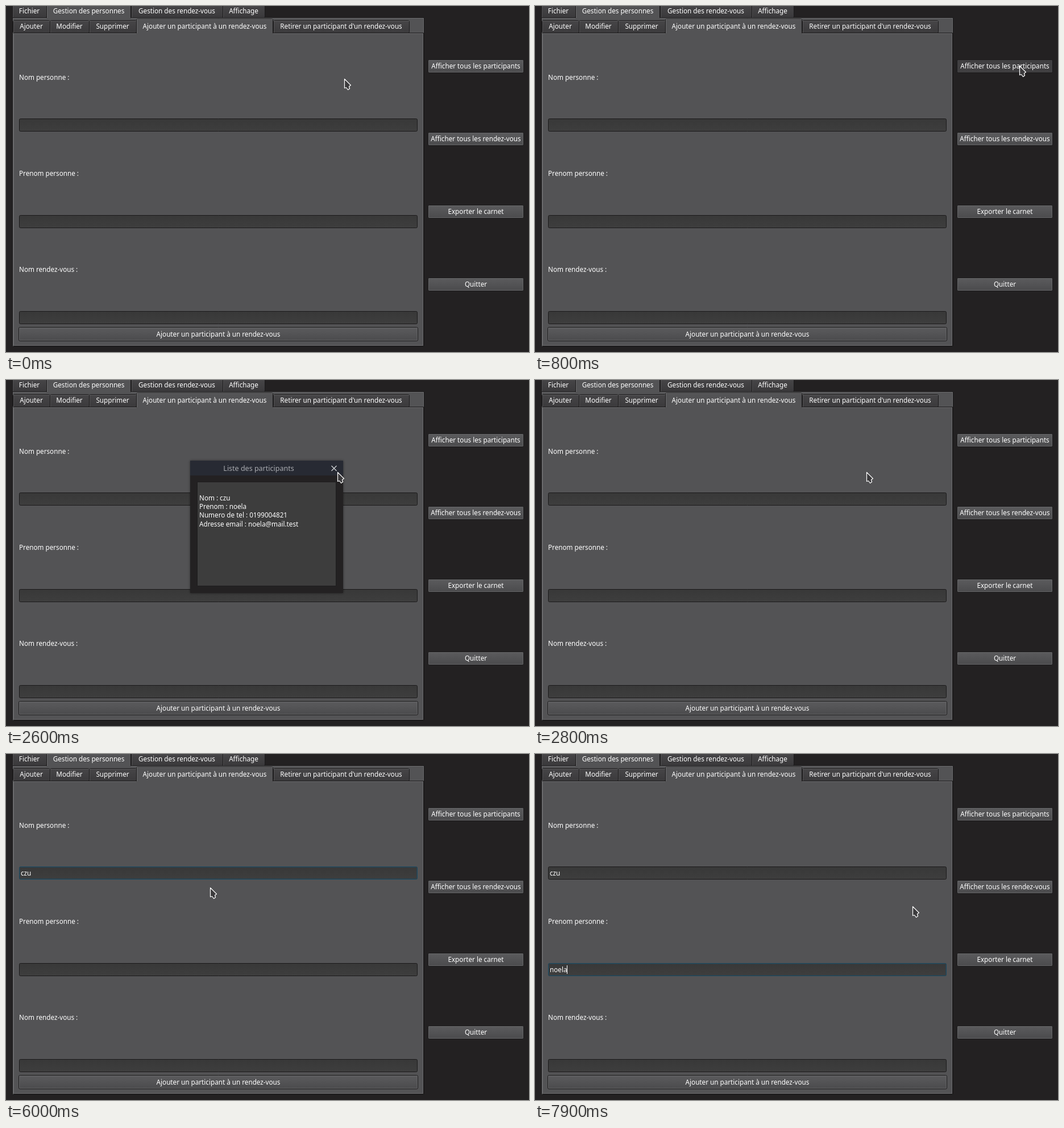
An HTML page with a canvas that plays this animation: 920 px wide and 609 px high, repeating every 8000 ms.

```html
<!DOCTYPE html>
<html lang="fr">
<head>
<meta charset="utf-8">
<title>Carnet de rendez-vous</title>
<style>
  html, body { margin: 0; width: 100%; height: 100%; overflow: hidden; background: #232122; }
  canvas { display: block; width: 920px; height: 609px; }
</style>
</head>
<body>
<canvas id="stage" width="920" height="609"></canvas>
<script>
const ctx = document.getElementById('stage').getContext('2d');
const LOOP = 8000;
const TICK = 100;
const FONT = '500 11.7px "Noto Sans", "Open Sans", sans-serif';
const TITLE_FONT = '12.5px "Noto Sans", "Open Sans", sans-serif';
const BACK = '#232122';
const FACE = '#535355';
const EDGE = '#1b1a1b';
const SHINE = '#6b6b6d';

// Pointer moves: first tick, last tick, end x, y, and bend x, y.
const HOME = [595, 128];
const MOVES = [
  [200, 500, 857, 103, 1000, 140],
  [700, 700, 852, 105],
  [900, 1500, 492, 236, 720, 220],
  [1800, 1800, 479, 234],
  [2000, 2600, 583, 162, 590, 110],
  [3000, 3500, 377, 201, 480, 105],
  [4000, 4000, 376, 201],
  [4500, 4500, 375, 202],
  [6000, 6000, 359, 235],
  [6100, 6500, 309, 382, 325, 310],
  [7700, 7900, 664, 268, 500, 330]
];

const NAME = [[0, ''], [4600, 'c'], [4900, 'cs'], [5200, 'c'], [5300, 'cz'], [5500, 'czu']];
const FIRST = [[0, ''], [6900, 'n'], [7000, 'no'], [7100, 'noe'], [7200, 'noel'], [7500, 'noela']];
const FOCUS = [[0, -1], [3500, 0], [6500, 1]];
const CARET_RESET = [...FOCUS, ...NAME, ...FIRST].map(k => k[0]);

const latest = (keys, t) => keys.filter(k => k[0] <= t).pop()[1];
const dialogOpen = t => t >= 900 && t < 2800;

function pointerAt(t) {
  const now = Math.floor(t / TICK) * TICK;
  let [x, y] = HOME;
  for (const [from, to, ex, ey, bx = ex, by = ey] of MOVES) {
    if (now < from) break;
    const u = Math.min(1, (now - from + TICK) / (to - from + TICK));
    const bend = (a, b, c) => (1 - u) ** 2 * a + 2 * u * (1 - u) * b + u * u * c;
    [x, y] = [bend(x, bx, ex), bend(y, by, ey)];
  }
  return [Math.round(x), Math.round(y)];
}

function overText(x, y, t) {
  if (dialogOpen(t)) return x > 336 && x < 581 && y > 179 && y < 363;
  return x > 23 && x < 724 && [198, 368, 537].some(top => y >= top && y < top + 23);
}

function box(x, y, w, h, fill) {
  ctx.fillStyle = fill;
  ctx.fillRect(x, y, w, h);
}

function fade(y, h, top, bottom) {
  const g = ctx.createLinearGradient(0, y, 0, y + h);
  g.addColorStop(0, top);
  g.addColorStop(1, bottom);
  return g;
}

function frame(x, y, w, h, r, fill, stroke) {
  ctx.beginPath();
  ctx.roundRect(x + .5, y + .5, w - 1, h - 1, r);
  ctx.fillStyle = fill;
  ctx.fill();
  ctx.strokeStyle = stroke;
  ctx.lineWidth = 1;
  ctx.stroke();
}

function label(s, x, y, align = 'left', color = '#fff', font = FONT) {
  ctx.font = font;
  ctx.textAlign = align;
  ctx.fillStyle = color;
  ctx.fillText(s, x, y);
}

function tab(s, x, right, top, bottom, active) {
  const w = right - x;
  const h = bottom - top;
  if (active) {
    frame(x, top - 2, w, h + 6, 2, FACE, EDGE);
    box(x + 1, top - 1, w - 2, 1, SHINE);
    box(x + 1, top, 1, h, SHINE);
    box(x, bottom, w, 5, FACE);
  } else {
    frame(x, top, w + 1, h + 1, 2, fade(top, h, '#474648', '#3b3a3c'), EDGE);
    box(x + 1, top + 1, w - 1, 1, '#5a595b');
    box(x + 1, top + 2, 1, h - 2, '#525153');
  }
  label(s, x + w / 2, bottom - (active ? 8 : 7), 'center');
}

// Lays tabs side by side; each entry is a caption and its right edge.
function tabRow(x, top, bottom, tabs, active) {
  const lefts = tabs.map((_, i) => i ? tabs[i - 1][1] : x);
  tabs.forEach(([s, right], i) => i !== active && tab(s, lefts[i], right, top, bottom));
  tab(tabs[active][0], lefts[active], tabs[active][1], top - 1, bottom + 1, true);
}

function button(s, x, y, w, h, pressed) {
  const fill = pressed ? '#403f41' : fade(y, h, '#5c5c5e', '#4a4a4c');
  frame(x, y, w, h, 2, fill, EDGE);
  if (!pressed) frame(x + 1, y + 1, w - 2, h - 2, 1, fill, '#666668');
  label(s, x + w / 2, y + h / 2 + 4, 'center');
}

function field(y, s, focused, caret) {
  frame(23, y, 701, 23, 2, fade(y, 23, '#383838', '#3e3e3e'), focused ? '#1c495f' : EDGE);
  if (focused) frame(24, y + 1, 699, 21, 1, 'transparent', '#2f414b');
  label(s, 26, y + 16);
  if (focused && caret) box(Math.round(26 + ctx.measureText(s).width), y + 4, 1, 15, '#fff');
}

function dialog() {
  ctx.save();
  ctx.shadowColor = 'rgba(0,0,0,.5)';
  ctx.shadowBlur = 4;
  box(324, 142, 269, 233, BACK);
  ctx.restore();
  box(324, 142, 269, 26, '#272a33');
  label('Liste des participants', 444.5, 160, 'center', '#a9abb0', TITLE_FONT);
  ctx.strokeStyle = '#d5d7da';
  ctx.lineWidth = 1.2;
  ctx.beginPath();
  for (const d of [-4.5, 4.5]) {
    ctx.moveTo(577 - d, 151);
    ctx.lineTo(577 + d, 160);
  }
  ctx.stroke();
  frame(336, 179, 245, 184, 0, '#3d3d3d', '#1e1d1e');
  ['Nom : czu', 'Prenom : noela', 'Numero de tel : 0199004821', 'Adresse email : noela@mail.test']
    .forEach((s, i) => label(s, 340, 211.5 + i * 15.4));
}

function beam() {
  ctx.beginPath();
  for (const y of [-7, 7]) {
    ctx.moveTo(-3, y);
    ctx.lineTo(3, y);
    ctx.moveTo(0, 0);
    ctx.lineTo(0, y);
  }
  ctx.lineCap = 'square';
  for (const [color, width] of [['#222', 3], ['#fff', 1.3]]) {
    ctx.strokeStyle = color;
    ctx.lineWidth = width;
    ctx.stroke();
  }
}

function arrow() {
  const shape = new Path2D('M0 0V16L3 15L6 19L9 17L8 13L11 11Z');
  ctx.fillStyle = '#3c3b3d';
  ctx.fill(shape);
  ctx.strokeStyle = '#fff';
  ctx.lineWidth = 1.2;
  ctx.lineJoin = 'round';
  ctx.stroke(shape);
}

function pointer(t) {
  const [x, y] = pointerAt(t);
  ctx.save();
  ctx.translate(x + .5, y + .5);
  if (overText(x, y, t)) beam();
  else arrow();
  ctx.restore();
}

function windowBody(pressed) {
  box(0, 0, 920, 609, BACK);
  frame(11, 20, 725, 580, 0, FACE, EDGE);
  frame(12, 21, 723, 578, 0, FACE, SHINE);
  tabRow(11, -3, 20, [['Fichier', 71], ['Gestion des personnes', 220],
    ['Gestion des rendez-vous', 381], ['Affichage', 455]], 1);

  frame(13, 47, 722, 552, 0, FACE, EDGE);
  frame(13, 48, 721, 550, 0, FACE, SHINE);
  tabRow(12, 25, 47, [['Ajouter', 77], ['Modifier', 146], ['Supprimer', 229],
    ['Ajouter un participant à un rendez-vous', 470],
    ["Retirer un participant d'un rendez-vous", 709]], 3);

  ['Nom personne :', 'Prenom personne :', 'Nom rendez-vous :']
    .forEach((s, i) => label(s, 23, 130 + i * 169));
  button('Ajouter un participant à un rendez-vous', 22, 565, 703, 25);
  ['Afficher tous les participants', 'Afficher tous les rendez-vous', 'Exporter le carnet', 'Quitter']
    .forEach((s, i) => button(s, 742, 94 + i * 128, 169, 24, pressed && i === 0));
}

function draw(t) {
  const focus = latest(FOCUS, t);
  const reset = Math.max(...CARET_RESET.filter(k => k <= t));
  const caret = (t - reset) % 1000 < 500;
  windowBody(t >= 700 && t < 900);
  field(198, latest(NAME, t), focus === 0, caret);
  field(368, latest(FIRST, t), focus === 1, caret);
  field(537, '');
  if (dialogOpen(t)) dialog();
  pointer(t);
}

const start = performance.now();
function tick() {
  draw((performance.now() - start) % LOOP);
  requestAnimationFrame(tick);
}
tick();
</script>
</body>
</html>
```
